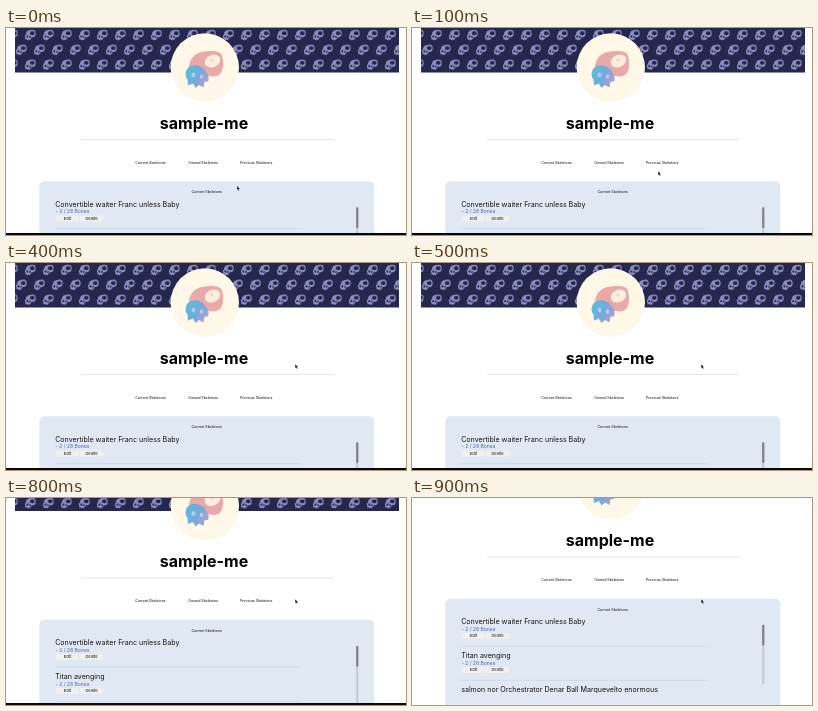
Recreate the animation shown at these times as an HTML page. Size 400 by 207 pixels, loop 1 s.

```html
<!DOCTYPE html>
<html lang="en">
<head>
<meta charset="utf-8">
<title>Profile page</title>
<style>
  html, body { margin: 0; width: 100%; height: 100%; overflow: hidden; background: #fff; }
  svg { display: block; width: 100vw; height: 100vh; }
  text { font-family: Inter, "Liberation Sans", sans-serif; fill: #111; }
  .name { font-size: 16px; font-weight: 700; text-anchor: middle; fill: #000; }
  .small { font-size: 3.62px; }
  .mid { text-anchor: middle; }
  .item { font-size: 7.09px; }
  .count { font-size: 5.05px; fill: #4f60a8; }
  .btn { font-size: 4.05px; text-anchor: middle; }
</style>
</head>
<body>
<svg viewBox="0 0 400 207" preserveAspectRatio="none">
  <defs>
    <linearGradient id="lilac" x1="0" y1="1" x2="1" y2="0">
      <stop offset="0" stop-color="#9a9dcb"/>
      <stop offset="1" stop-color="#7579ae"/>
    </linearGradient>
    <linearGradient id="candy" x1="0" y1=".3" x2="1" y2=".8">
      <stop offset="0" stop-color="#5dbbdc"/>
      <stop offset=".5" stop-color="#73aadc"/>
      <stop offset="1" stop-color="#b9a0cf"/>
    </linearGradient>
    <clipPath id="bannerClip"><rect x="9" y="-1" width="384" height="45.4"/></clipPath>
    <clipPath id="listClip"><rect x="40" y="168" width="322" height="79.5"/></clipPath>
    <path id="dome" d="M183 40C183 30 190 23.6 201 23.3 208 22.7 214.5 23.2 215.8 27.5 217.8 33 217.8 41 214.5 45.5 211 49.5 205 48.5 201 47.5L192 48Z"/>
    <path id="jaw" d="M183 39C188 35.5 196 37.5 199.5 43 202.5 46 203.5 50 202 53.5L198.5 53.8 197.5 59.5 193 57 189.5 60 187 55.5 182 57.5 181.5 51.5C178.6 48.5 179 42 183 39Z"/>
    <g id="skull" transform="scale(.29) translate(-199 -41)">
      <use href="#dome" fill="url(#lilac)"/>
      <use href="#jaw" fill="url(#lilac)"/>
      <g fill="#26274c">
        <ellipse cx="205" cy="35" rx="8" ry="6.5"/>
        <ellipse cx="188" cy="46.5" rx="3.4" ry="4"/>
        <ellipse cx="197" cy="48" rx="2.6" ry="3.2"/>
      </g>
    </g>
  </defs>
  <rect width="400" height="207" fill="#fff"/>
  <g id="page">
    <g clip-path="url(#bannerClip)">
      <rect x="9" y="-1" width="384" height="46" fill="#26274c"/>
      <g id="pattern"></g>
    </g>
    <circle cx="198.8" cy="39.5" r="34.2" fill="#fff8e8"/>
    <use href="#dome" fill="#e9a9a8"/>
    <ellipse cx="206.5" cy="33" rx="8" ry="6.2" transform="rotate(-25 206.5 33)" fill="#fdeedf"/>
    <circle cx="206" cy="32" r="1.5" fill="#f3d0c4"/>
    <use href="#jaw" fill="url(#candy)"/>
    <ellipse cx="187.5" cy="47" rx="2" ry="2.5" fill="#a9cfe6"/>
    <ellipse cx="195.5" cy="48.5" rx="1.7" ry="2.2" fill="#c3c6e4"/>
    <text class="name" x="198" y="100.5">sample-me</text>
    <path d="M75 111.5H328" stroke="#e2e2e2" stroke-width=".8"/>
    <text class="small" x="129.2" y="135.6">Current Skeletons</text>
    <text class="small" x="182.2" y="135.6">Owned Skeletons</text>
    <text class="small" x="234" y="135.6">Previous Skeletons</text>
    <rect x="33.3" y="153.2" width="335" height="140" rx="5" fill="#e0e9f3"/>
    <text class="small mid" x="200.7" y="165.1">Current Skeletons</text>
    <g id="list" clip-path="url(#listClip)"></g>
    <rect x="350.2" y="179.3" width="2" height="59.5" rx="1" fill="#c3c9d0"/>
    <rect x="350" y="179.3" width="2.4" height="20.8" rx="1.2" fill="#85898e"/>
  </g>
  <rect id="edge" y="205" width="400" height="2" fill="#080808"/>
  <path id="cursor" d="M0 0V4L1 3.2 1.7 4.7 2.4 4.4 1.7 3H3Z" fill="#000" stroke="#fff" stroke-width=".25"/>
</svg>
<script>
  const $ = id => document.getElementById(id);

  // Banner: three staggered rows of skulls
  const PITCH = 18;
  let skulls = "";
  for (let row = 0; row < 3; row++) {
    const start = 6.5 + (row % 2) * PITCH / 2;
    for (let x = start; x < 400; x += PITCH) {
      skulls += `<use href="#skull" x="${x}" y="${7 + row * 14.8}"/>`;
    }
  }
  $("pattern").innerHTML = skulls;

  const button = (x, label) =>
    `<rect x="${x}" y="187.4" width="23" height="5.8" rx="1" fill="#f0f0ee"/>` +
    `<text class="btn" x="${x + 11.6}" y="191.8">${label}</text>`;

  const titles = [
    "Convertible waiter Franc unless Baby",
    "Titan avenging",
    "salmon nor Orchestrator Denar Ball Marquevelto enormous"
  ];
  $("list").innerHTML = titles.map((title, i) =>
    `<g transform="translate(0 ${i * 34.2})">
      <text class="item" x="49.2" y="178.5">${title}</text>
      <text class="count" x="49.4" y="185.3">- 2 / 28 Bones</text>
      ${button(49.8, "Edit")}${button(74, "Delete")}
      <path d="M49 200.6H295" stroke="#cbd4df" stroke-width=".7"/>
    </g>`).join("");

  const LOOP = 1000, STEP = 100;
  const scrollSteps = { 7: 3.5, 8: 31.5, 9: 52.5 };
  const ease = p => p * p * (3 - 2 * p);

  function draw(ms) {
    const step = Math.floor((ms % LOOP) / STEP);
    const scroll = scrollSteps[step] || 0;
    const p = ease(Math.min(1, step / 3));
    $("page").setAttribute("transform", `translate(0 ${-scroll})`);
    $("cursor").setAttribute("transform", `translate(${231 + 58.2 * p} ${158 - 56.7 * p})`);
    $("edge").setAttribute("visibility", step === 9 ? "hidden" : "visible");
  }

  const begin = performance.now();
  function tick() {
    draw(performance.now() - begin);
    requestAnimationFrame(tick);
  }
  draw(0);
  requestAnimationFrame(tick);
</script>
</body>
</html>
```
